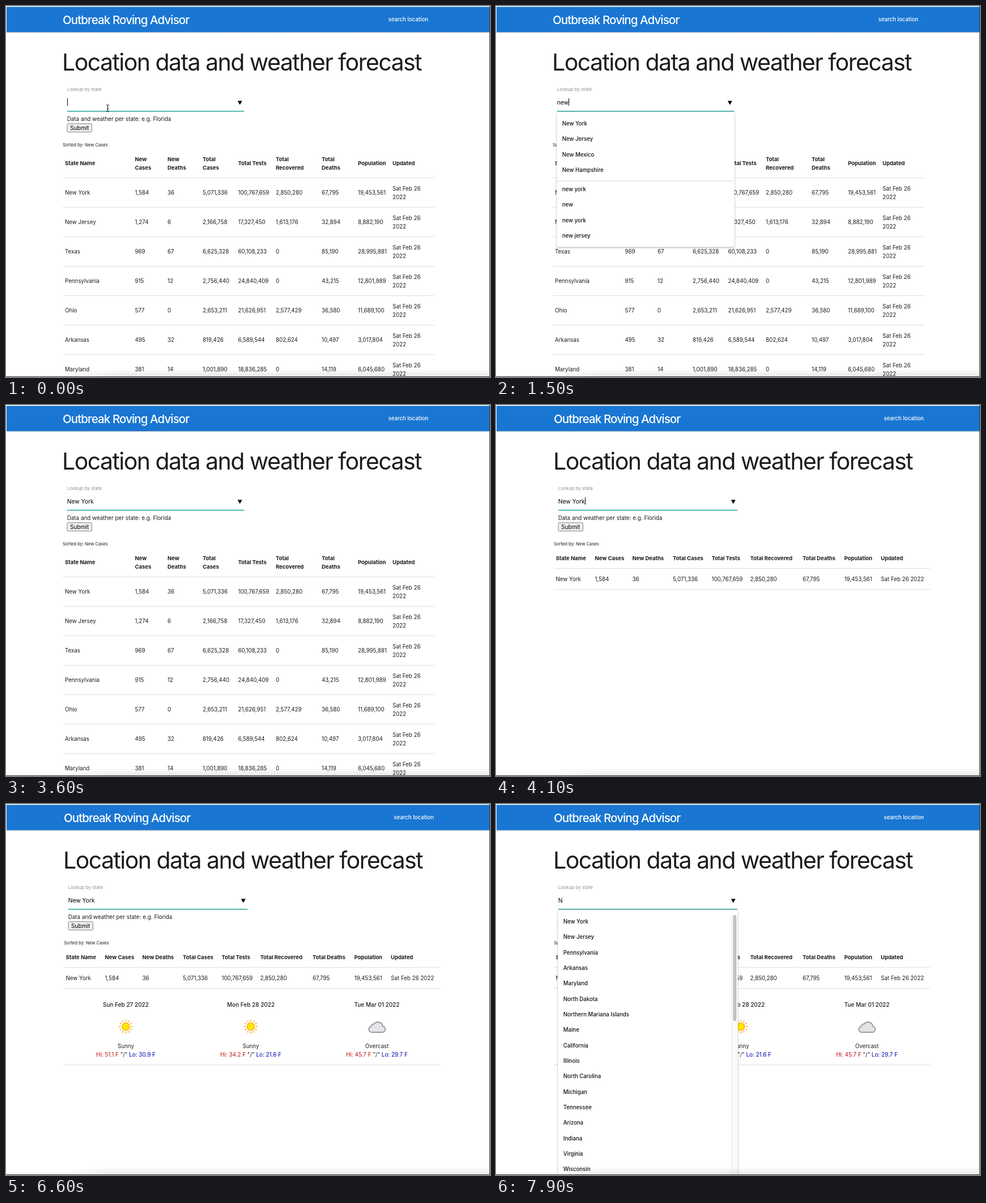
These frames come from a looping animation (854 by 655 pixels, 8000 ms). An HTML page:

```html
<!DOCTYPE html>
<html lang="en">
<head>
<meta charset="utf-8">
<title>Location data and weather forecast</title>
<style>
html, body { margin: 0; width: 100%; height: 100%; overflow: hidden; background: #fff; }
svg { display: block; width: 854px; height: 655px; }
text { font: 9.75px Inter, "Open Sans", sans-serif; font-optical-sizing: none; fill: #1c1c1c; white-space: pre; }
.brand { font-size: 20.5px; font-weight: 500; letter-spacing: -.9px; fill: #fff; }
.nav { font-weight: 500; letter-spacing: -.06px; fill: #fff; }
.h1 { font-size: 41px; letter-spacing: -1.54px; }
.label { font-size: 8.1px; fill: #8e8e8e; }
.input { font-size: 10.3px; fill: #000; }
.help { font-size: 9.85px; }
.btn { font-size: 10.1px; fill: #000; }
.small { font-size: 7.6px; }
.th { font-size: 9.5px; font-weight: 700; letter-spacing: -.03px; }
.opt { font-size: 9.65px; font-weight: 500; fill: #111; }
.date { font-size: 10px; font-weight: 500; }
.temp { font-size: 9.9px; }
.mid { text-anchor: middle; }
.panel { filter: drop-shadow(0 1px 1.5px rgba(0,0,0,.35)); }
</style>
</head>
<body>
<svg viewBox="0 0 854 655">
  <defs>
    <linearGradient id="shade" x2="0" y2="1">
      <stop offset="0" stop-opacity="0"/><stop offset="1" stop-opacity=".1"/>
    </linearGradient>
    <linearGradient id="drop" x2="0" y2="1">
      <stop offset="0" stop-opacity=".22"/><stop offset="1" stop-opacity="0"/>
    </linearGradient>
    <linearGradient id="fade">
      <stop offset="0" stop-color="#fff" stop-opacity="0"/><stop offset=".12" stop-color="#fff"/>
    </linearGradient>
    <mask id="side"><rect x="100" y="630" width="754" height="25" fill="url(#fade)"/></mask>
  </defs>
  <g id="page"></g>
  <g id="caret"><rect y="163" width="1" height="13"/></g>
  <g id="pointer"></g>
  <rect x="100" y="641" width="754" height="14" fill="url(#shade)" mask="url(#side)"/>
  <path d="M0 654.5H853.5V0" fill="none" stroke="#333"/>
</svg>
<script>
const LOOP = 8000;
const $ = id => document.getElementById(id);

const heads = ['State Name', 'New Cases', 'New Deaths', 'Total Cases', 'Total Tests',
  'Total Recovered', 'Total Deaths', 'Population', 'Updated'];
const rows = `New York|1,584|36|5,071,336|100,767,659|2,850,280|67,795|19,453,561
New Jersey|1,274|6|2,166,758|17,327,450|1,613,176|32,894|8,882,190
Texas|969|67|6,625,328|60,108,233|0|85,190|28,995,881
Pennsylvania|915|12|2,756,440|24,840,409|0|43,215|12,801,989
Ohio|577|0|2,653,211|21,626,951|2,577,429|36,580|11,689,100
Arkansas|495|32|819,426|6,589,544|802,624|10,497|3,017,804
Maryland|381|14|1,001,890|18,836,285|0|14,119|6,045,680`.split('\n').map(r => r.split('|'));
const wideCols = [104, 227.5, 285, 347, 409.5, 476, 557, 621, 682];
const oneCols = [105.5, 174.5, 240.5, 312, 380.5, 448.5, 541, 614.5, 679];

const list = s => s.split(',');
const past = list('new york,new,new york,new jersey');
const york = list('new york,new york');
const all = list('New York,New Jersey,Pennsylvania,Arkansas,Maryland,North Dakota,Northern Mariana Islands,' +
  'Maine,California,Illinois,North Carolina,Michigan,Tennessee,Arizona,Indiana,Virginia,Wisconsin');
const ne = list('New York,New Jersey,Maine,Tennessee,Minnesota,Connecticut,Nebraska,New Mexico,New Hampshire');
const news = list('New York,New Jersey,New Mexico,New Hampshire');

// time, typed text, suggestions, earlier entries
const steps = [
  [0, ''], [1000, 'n', all, []], [1300, 'ne', ne, past], [1500, 'new', news, past],
  [3000, 'New York'],
  [6800, 'New Yor', ['New York'], york], [7000, 'New Yo', ['New York'], york],
  [7200, 'New Y', ['New York', 'New Jersey'], york],
  [7400, 'New ', news, past], [7500, 'New', news, past], [7600, 'Ne', ne, past], [7900, 'N', all, []]
];
const blinks = [300, 800, 2000, 2300, 3600, 4100, 4600, 5100, 5600, 6100, 6600, 7000, 7700];

const text = (x, y, s, cls = '') => `<text x="${x}" y="${y}" dy=".36em" class="${cls}">${s}</text>`;
const rect = (x, y, w, h, fill, more = '') =>
  `<rect x="${x}" y="${y}" width="${w}" height="${h}" fill="${fill}" ${more}/>`;
const line = (x1, x2, y) => rect(x1, y, x2 - x1, 1, '#dfdfdf');

// one or two lines of text around a common centre
const stack = (x, y, parts, cls) =>
  parts.map((s, i) => text(x, y + (i - (parts.length - 1) / 2) * 15.1, s, cls)).join('');

function bigTable() {
  let out = heads.map((h, i) =>
    stack(wideCols[i], 278, [0, 4, 7, 8].includes(i) ? [h] : h.split(' '), 'th')).join('') + line(100, 756, 303);
  rows.forEach((row, r) => {
    const y = 329.7 + r * 52;
    out += row.map((s, i) => text(wideCols[i], y, s)).join('') +
      stack(wideCols[8], y, ['Sat Feb 26', '2022']) + line(100, 756, 355 + r * 52);
  });
  return out;
}

const smallTable = () =>
  heads.map((h, i) => text(oneCols[i], 270.5, h, 'th')).join('') +
  [...rows[0], 'Sat Feb 26 2022'].map((s, i) => text(oneCols[i], 307, s)).join('') +
  line(102, 766, 288) + line(102, 766, 325);

function sun(x) {
  let rays = '';
  for (let a = 0; a < 360; a += 30)
    rays += `<path d="M0-9.3V-12" transform="rotate(${a})" stroke="#f7a928" stroke-width="1.8"/>`;
  return `<g transform="translate(${x} 393)">${rays}<circle r="6.7" fill="#ffe600" stroke="#f9ae2b" stroke-width="1.6"/></g>`;
}
const cloud = x => `<path transform="translate(${x} 393)" fill="#e4e4e7" stroke="#9c9ca0" stroke-width="2"
  d="M-9 10H9.5A5.3 5.3 0 0 0 10.5-.5A9 9 0 0 0-5.5-4.5A5.5 5.5 0 0 0-10.5-.2A5.2 5.2 0 0 0-9 10Z"/>`;

const day = (x, date, icon, sky, hi, lo) =>
  text(x, 354, date, 'mid date') + icon(x) + text(x, 427, sky, 'mid') +
  text(x, 442, `<tspan fill="#c41010">Hi: ${hi} F</tspan> "/" <tspan fill="#0000b4">Lo: ${lo} F</tspan>`, 'mid temp');

const weather = () =>
  day(211.5, 'Sun Feb 27 2022', sun, 'Sunny', '51.1', '30.9') +
  day(432, 'Mon Feb 28 2022', sun, 'Sunny', '34.2', '21.6') +
  day(654.5, 'Tue Mar 01 2022', cloud, 'Overcast', '45.7', '29.7') + line(102, 766, 460);

function dropdown(x, w, options, history, lit) {
  const long = options === all, pitch = 27.33;
  const sep = 207.5 + (options.length - 1) * pitch + 19.5;
  const bottom = long ? 670 : sep + 15 + (history.length - 1) * pitch + 19.5;
  let out = rect(x - .5, 187.5, w + 1, bottom - 187.5, '#fff', 'rx="2.5" class="panel"');
  if (lit) out += rect(x, 194, w, 27, '#e8e8ea');
  out += options.map((s, i) => text(x + 9, 207.5 + i * pitch, s, 'opt')).join('');
  if (long)
    out += rect(x + w - 11, 194, 11, 470, '#fafafa') + rect(x + w - 11, 194, 1, 470, '#e8e8e8') +
      rect(x + w - 8, 196, 6, 187, '#c2c2c2', 'rx="3"');
  else
    out += rect(x, sep - .5, w, 1, '#dadada') +
      history.map((s, i) => text(x + 9, sep + 14.7 + i * pitch, s, 'opt')).join('');
  return out;
}

function page(t, [, typed, options, history]) {
  const done = t >= 3900;
  const left = done ? 102 : 100, x = left + 7.7, w = done ? 316.5 : 312.5, a = x + w - 7.5;
  return rect(1, 1.5, 852, 44.7, '#1976d2') + rect(1, 46.2, 852, 2.5, 'url(#drop)') +
    text(left, 24.5, 'Outbreak Roving Advisor', 'brand') +
    text(done ? 684.3 : 674.5, 23.7, 'search location', 'nav') +
    text(left - 1, 99.5, 'Location data and weather forecast', 'h1') +
    text(x, 147.3, 'Lookup by state', 'label') +
    `<text id="typed" x="${x}" y="170" dy=".36em" class="input">${typed}</text>` +
    `<path d="M${a - 4} 167.5h8l-4 7z"/>` +
    rect(x, 185, w, 1.5, '#26a69a') +
    text(x, 199, 'Data and weather per state: e.g. Florida', 'help') +
    rect(x + .3, 207.8, 43.4, 14.7, '#efefef', 'rx="1.5" stroke="#767676" stroke-width=".9"') +
    text(x + 22, 215, 'Submit', 'btn mid') +
    text(left, 245.3, 'Sorted by: New Cases', 'small') +
    (done ? smallTable() : bigTable()) + (t >= 4300 ? weather() : '') +
    (options ? dropdown(x, w, options, history, t >= 2600 && t < 3000) : '');
}

function pointer(t) {
  if (t < 100)
    return `<path d="M177 174.5q2.5 0 2.5 1.5v9q0 1.5-2.5 1.5M182 174.5q-2.5 0-2.5 1.5v9q0 1.5 2.5 1.5M178 181.5h3"
      fill="none" stroke="#111"/>`;
  if (t >= 300) return '';
  const [x, y] = t < 200 ? [520, 99] : [848, 21];
  return `<path transform="translate(${x} ${y})" d="M0 0v12l2.7-2.5 2 4.5 2-.9-2-4.3h3.7z" stroke="#fff" stroke-width=".8"/>`;
}

let shown = '', aimed = null;
function frame(now) {
  const t = now % LOOP;
  const step = steps.filter(s => s[0] <= t).pop();
  const html = page(t, step), aim = pointer(t);
  if (html !== shown) {
    $('page').innerHTML = shown = html;
    const typed = $('typed');
    const end = +typed.getAttribute('x') + (step[1] ? typed.getComputedTextLength() : 0);
    $('caret').setAttribute('transform', `translate(${Math.round(end)} 0)`);
  }
  if (aim !== aimed) $('pointer').innerHTML = aimed = aim;
  $('caret').style.display = blinks.filter(b => b <= t).length % 2 ? 'none' : '';
}

const start = performance.now();
function tick() {
  frame(performance.now() - start);
  requestAnimationFrame(tick);
}
tick();
</script>
</body>
</html>
```
